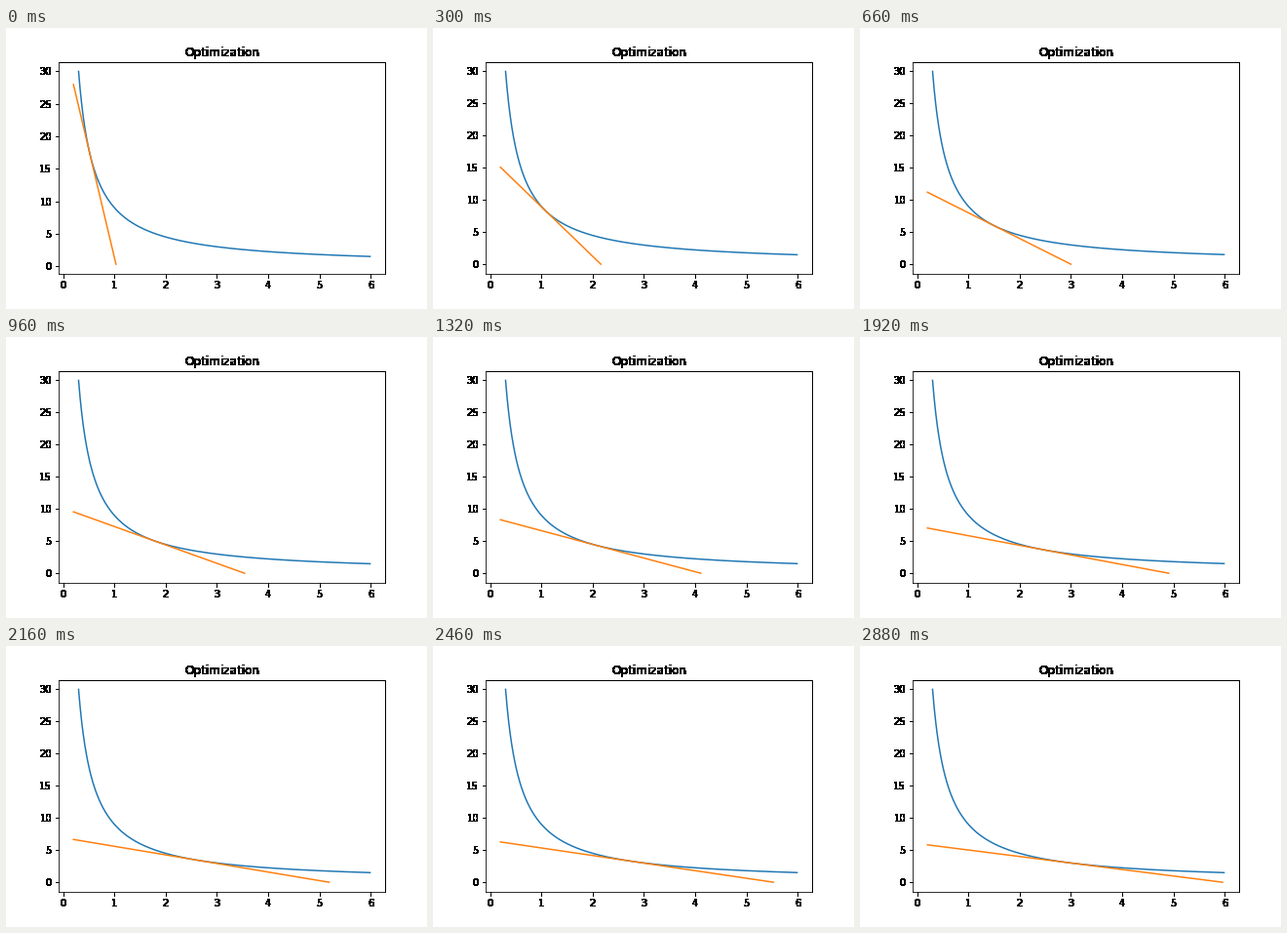
Recreate the animation shown at these times as a matplotlib script. Size 432 px wide and 288 px high, loop 2.94 s.

```python
import numpy as np
import matplotlib.pyplot as plt
from matplotlib.animation import FuncAnimation

FRAMES, INTERVAL = 49, 60
AREA = 9  # the curve is x * y = AREA
STEP = 0.01

plt.rcParams.update({"font.family": "DejaVu Sans", "font.size": 10,
                     "figure.subplot.bottom": 0.125})


def harden(img, dpi):
    """Turn soft edges into solid pixels."""
    out = img.copy()
    out[..., 3] = img[..., 3] > 0
    return out, 0, 0


fig, ax = plt.subplots(figsize=(6, 4), dpi=72)
ax.set_title("Optimization")
for artist in (ax.title, ax.xaxis, ax.yaxis, ax.spines["top"], ax.spines["right"]):
    artist.set_agg_filter(harden)

curve_x = np.arange(0.3, 6, STEP)
line_x = np.arange(0.2, 6, STEP)
ax.plot(curve_x, AREA / curve_x)
tangent, = ax.plot([], [])


def update(i):
    ratio = 0.03 + 0.02 * i
    touch = np.sqrt(AREA * ratio)
    y = 2 * AREA / touch - line_x / ratio
    keep = y > -1e-9
    tangent.set_data(line_x[keep], y[keep])
    ax.relim()
    ax.autoscale_view()
    return tangent,


anim = FuncAnimation(fig, update, frames=FRAMES, interval=INTERVAL,
                     repeat=True, repeat_delay=0, blit=False)
plt.show()
```
